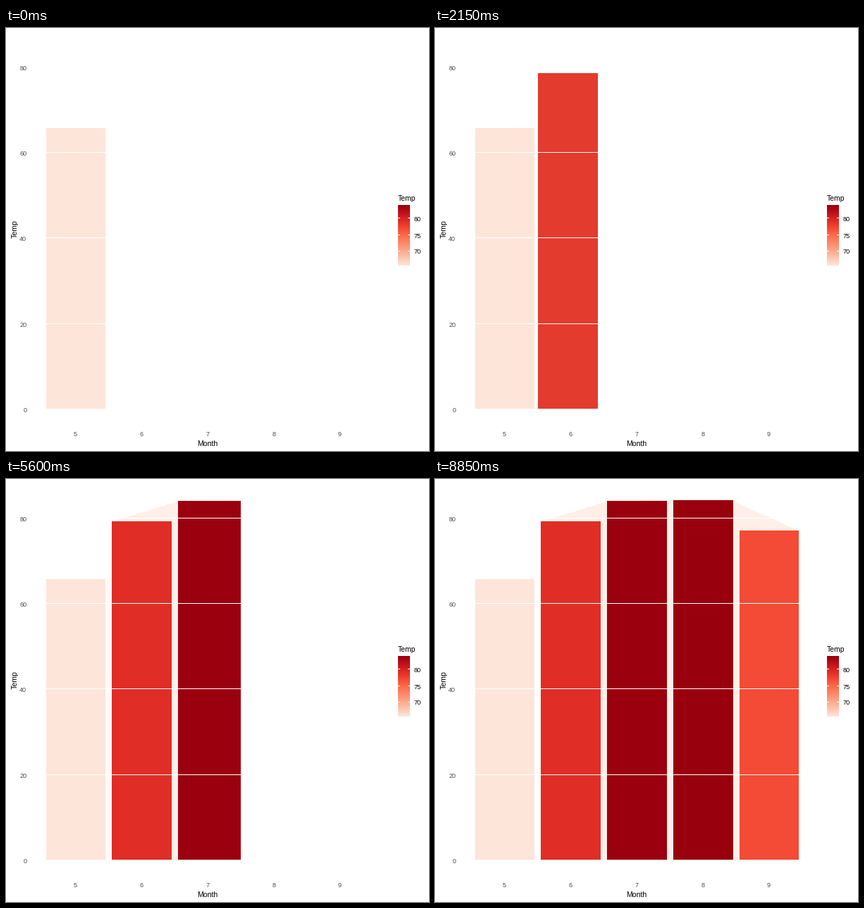
These frames come from a looping animation (600 px wide and 600 px high, 10 s). A matplotlib script:

```python
import numpy as np
import matplotlib.pyplot as plt
from matplotlib.animation import FuncAnimation
from matplotlib.collections import PolyCollection
from matplotlib.colors import to_rgb

plt.rcParams["font.family"] = "Liberation Sans"

SIZE, DPI = 600, 100
FRAMES, INTERVAL = 200, 50
STEPS = 22
STARTS = [24, 68, 112, 156]          # first frame of each transition
TEMPS = [65.55, 79.1, 83.9, 83.97, 76.9]
TOPS = [142, 60, 31, 30, 73]
LEFT, PITCH, BAR_WIDTH, BASE = 56.6, 93.75, 84.7, 540
TRAIL = to_rgb("#ffefe8")
REDS = ["#fee5d9", "#fcbba1", "#fc9272", "#fb6a4a",
        "#ef3b2c", "#cb181d", "#99000d"]

TO_XYZ = np.array([[0.4124, 0.3576, 0.1805],
                   [0.2126, 0.7152, 0.0722],
                   [0.0193, 0.1192, 0.9505]])
WHITE = TO_XYZ.sum(axis=1)


def to_lab(color):
    c = np.array(to_rgb(color))
    linear = np.where(c <= 0.04045, c / 12.92, ((c + 0.055) / 1.055) ** 2.4)
    x, y, z = TO_XYZ @ linear / WHITE
    fx, fy, fz = [v ** (1 / 3) if v > 0.008856 else 7.787 * v + 16 / 116
                  for v in (x, y, z)]
    return np.array([116 * fy - 16, 500 * (fx - fy), 200 * (fy - fz)])


def from_lab(lab):
    fy = (lab[0] + 16) / 116
    f = np.array([fy + lab[1] / 500, fy, fy - lab[2] / 200])
    xyz = np.where(f > 0.2069, f ** 3, (f - 16 / 116) / 7.787) * WHITE
    c = np.clip(np.linalg.solve(TO_XYZ, xyz), 0, 1)
    return np.where(c <= 0.0031308, 12.92 * c, 1.055 * c ** (1 / 2.4) - 0.055)


def mix(a, b, t):
    """Blend two colours in Lab space."""
    return from_lab((1 - t) * to_lab(a) + t * to_lab(b))


def fill_color(temp):
    pos = (temp - min(TEMPS)) / (max(TEMPS) - min(TEMPS)) * (len(REDS) - 1)
    i = min(int(pos), len(REDS) - 2)
    return mix(REDS[i], REDS[i + 1], pos - i)


COLORS = [fill_color(t) for t in TEMPS]


def box(x0, y0, x1, y1):
    return [(x0, y0), (x1, y0), (x1, y1), (x0, y1)]


def bar(position, top):
    x = LEFT + PITCH * position
    return box(round(x), round(top), round(x + BAR_WIDTH), BASE)


def moving_bar(k, step):
    t = step / STEPS
    return bar(k + t, TOPS[k] + (TOPS[k + 1] - TOPS[k]) * t)


fig = plt.figure(figsize=(SIZE / DPI, SIZE / DPI), dpi=DPI, facecolor="white")
ax = fig.add_axes([0, 0, 1, 1])
ax.axis("off")


def label(x, y, text, px, color="black", ha="left", rotation=0):
    ax.text(x, y, text, fontsize=px * 72 / DPI, color=color, ha=ha,
            va="baseline", rotation=rotation, rotation_mode="anchor")


# Axes
GREY = "#4d4d4d"
for value, y in zip(range(0, 100, 20), (545, 423.5, 302, 181, 60)):
    label(29.3, y, str(value), 9.2, GREY, "right")
for i in range(5):
    label(98.6 + PITCH * i, 579, str(5 + i), 9.2, GREY, "center")
label(285.5, 593, "Month", 10.5, ha="center")
label(15.5, 285.5, "Temp", 10.5, ha="center", rotation=90)

# Legend
label(556, 245, "Temp", 10.4)
ramp = np.array([[fill_color(t)]
                 for t in np.linspace(max(TEMPS), min(TEMPS), 86)])
ax.imshow(ramp, extent=(556, 573, 337, 251), aspect="auto",
          interpolation="nearest")
ticks = []
for value, y in ((80, 269), (75, 293), (70, 316)):
    label(579, y + 4.5, str(value), 9.2)
    ticks += [box(556, y, 559, y + 1), box(570, y, 573, y + 1)]
ax.add_collection(PolyCollection(ticks, facecolors="white", linewidths=0,
                                 antialiaseds=False, zorder=3))

bars = PolyCollection([], linewidths=0, antialiaseds=False, zorder=2)
ax.add_collection(bars, autolim=False)
grid = [box(50, y, 525, y + 1) for y in (419, 297, 176, 55)]
ax.add_collection(PolyCollection(grid, facecolors="white", linewidths=0,
                                 antialiaseds=False, zorder=3))
ax.set_xlim(0, SIZE)
ax.set_ylim(SIZE, 0)


def step_of(k, frame):
    if frame < STARTS[k]:
        return 0
    lead = 2 if k == 0 else 1
    return min(frame - STARTS[k] + lead, STEPS)


def update(frame):
    trail, solid = [], [(bar(0, TOPS[0]), COLORS[0])]
    for k in range(len(STARTS)):
        step = step_of(k, frame)
        if step == 0:
            break
        if k > 0:
            trail += [(moving_bar(k, s), TRAIL) for s in range(1, step)]
        color = mix(COLORS[k], COLORS[k + 1], step / STEPS)
        solid.append((moving_bar(k, step), color))
    shapes, colors = zip(*(trail + solid))
    bars.set_verts(shapes)
    bars.set_facecolor(colors)
    return [bars]


anim = FuncAnimation(fig, update, frames=FRAMES, interval=INTERVAL,
                     repeat=True, repeat_delay=0, blit=False)
plt.show()
```
